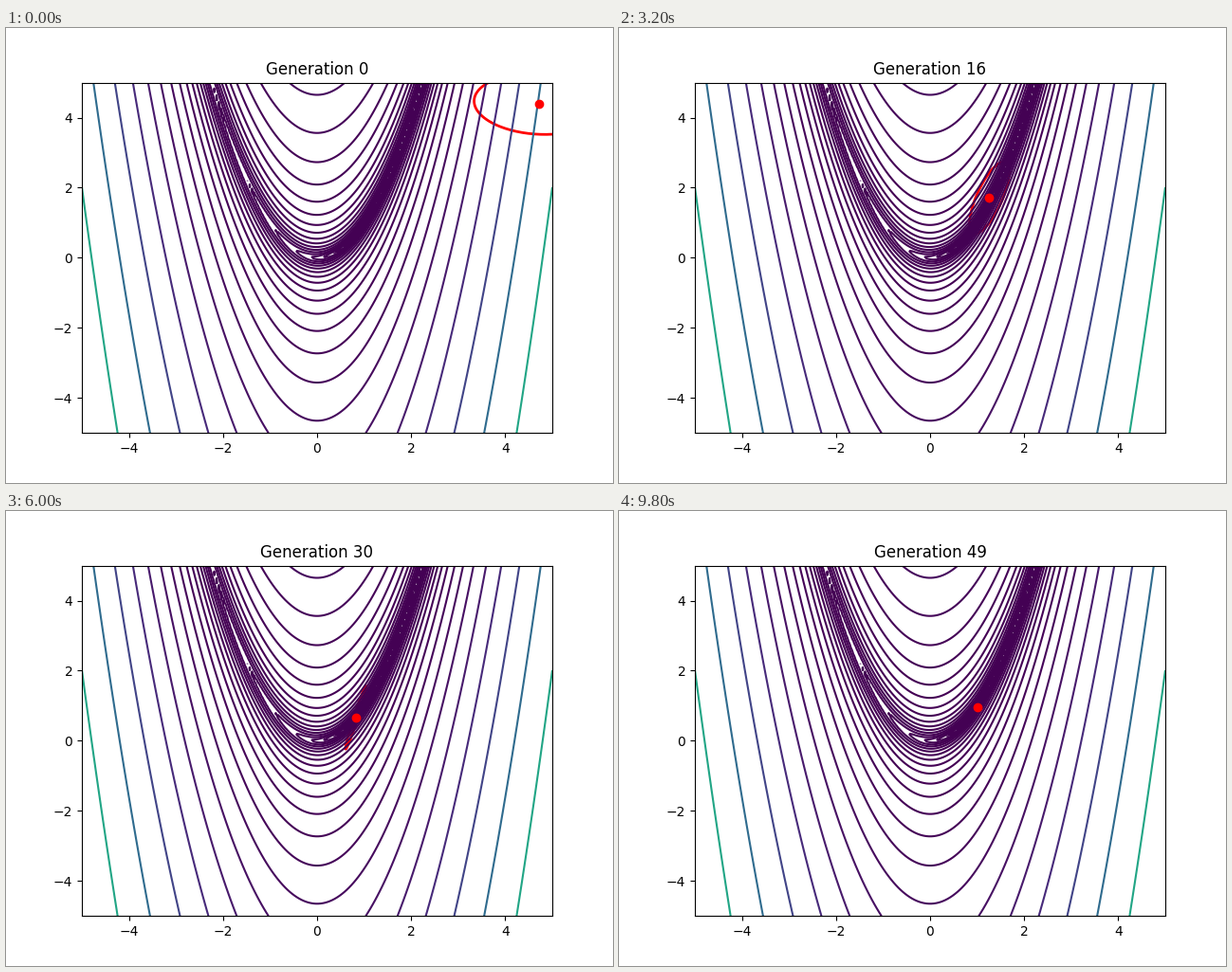
A matplotlib script that plays this animation: 640x480 px, repeating every 10 s.

```python
import numpy as np
import matplotlib.pyplot as plt
from matplotlib.animation import FuncAnimation

GENERATIONS = 50
SETTLE = 21  # from here on the mean glides into the optimum

# turning points of the search: generation -> mean x, mean y
TURNS = {0: (4.718, 4.394), 6: (1.17, 2.28), 9: (0.444, 0.31), 12: (0.35, 0.15),
         16: (1.26, 1.713), 18: (0.1, 0.25), SETTLE: (0.544, 0.376)}
GOAL = (1.018, 0.971)

# generation -> half width and half height of the ellipse
SIZES = {0: (1.38, 0.874), 9: (0.64, 0.695), 16: (0.42, 1.02),
         SETTLE: (0.20, 0.68), 30: (0.22, 0.90), 49: (0.04, 0.10)}


def rosenbrock(x, y):
    return (1 - x) ** 2 + 100 * (y - x ** 2) ** 2


def along(keys, gen):
    """Linear path through the key points."""
    return [np.interp(gen, list(keys), col) for col in zip(*keys.values())]


def ease_out(a, b, p, power):
    return a + (b - a) * (1 - (1 - p) ** power)


def mean_at(gen):
    x, y = along(TURNS, gen)
    if gen > SETTLE:
        p = (gen - SETTLE) / (GENERATIONS - 1 - SETTLE)
        x = ease_out(x, GOAL[0], p, 2.3)
        y = ease_out(y, GOAL[1], p, 1.7)
    return x, y


def correlation(gen):
    return 0.98 - 1.07 * np.exp(-(gen / 14) ** 2.5)


fig, ax = plt.subplots(figsize=(6.4, 4.8), dpi=100)

axis = np.linspace(-5, 5, 200)
X, Y = np.meshgrid(axis, axis)
Z = rosenbrock(X, Y)
ax.contour(X, Y, Z, levels=np.geomspace(Z.min(), Z.max(), 30), cmap="viridis")

# the ellipse lies beneath the contour lines, the mean above them
ellipse, = ax.plot([], [], color="red", lw=2, zorder=1)
mean, = ax.plot([], [], "ro")
title = ax.set_title("Generation 0")
ax.set_xlim(-5, 5)
ax.set_ylim(-5, 5)

theta = np.linspace(0, 2 * np.pi, 200)


def update(gen):
    x, y = mean_at(gen)
    sx, sy = along(SIZES, gen)
    rho = correlation(gen)
    c, s = np.cos(theta), np.sin(theta)
    ellipse.set_data(x + sx * c, y + sy * (rho * c + np.sqrt(1 - rho ** 2) * s))
    mean.set_data([x], [y])
    title.set_text(f"Generation {gen}")
    return ellipse, mean, title


anim = FuncAnimation(fig, update, frames=GENERATIONS, interval=200,
                     repeat=True, repeat_delay=0)
plt.show()
```
